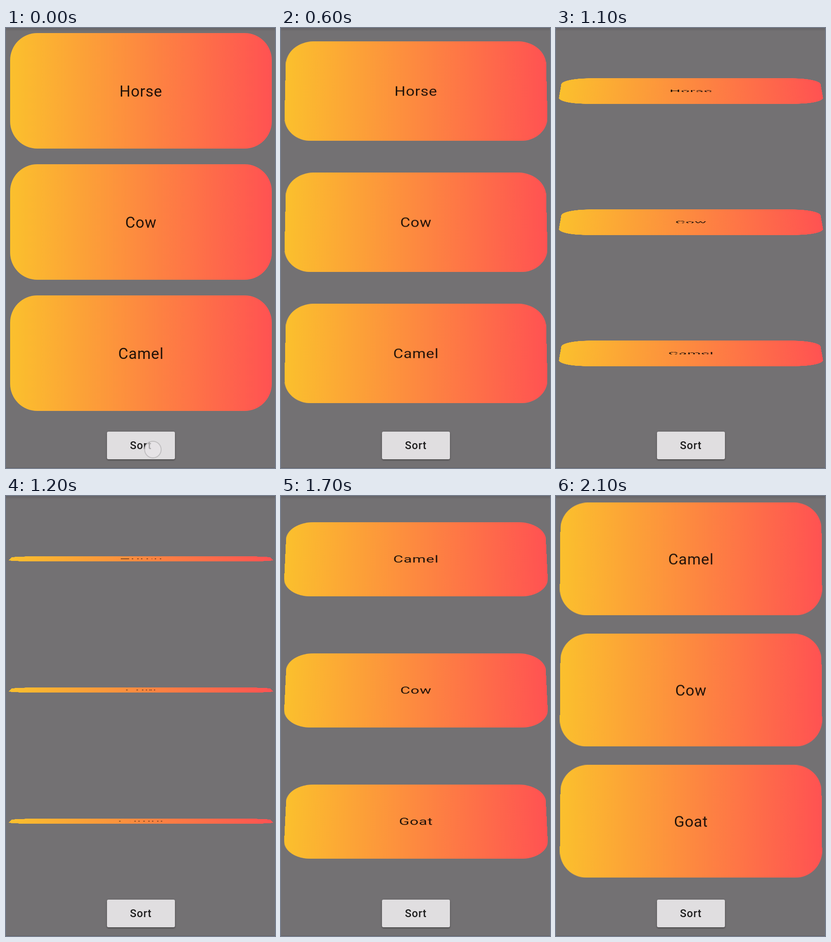
An HTML page that plays this animation: 586 px wide and 956 px high, repeating every 2.2 s.

```html
<!DOCTYPE html>
<html lang="en">
<head>
<meta charset="utf-8">
<title>Flip sort</title>
<style>
  html, body { margin: 0; width: 100%; height: 100%; overflow: hidden; }

  body {
    position: relative;
    background:
      linear-gradient(#656366, rgba(101, 99, 102, 0)) 0 0 / 100% 7px no-repeat,
      linear-gradient(#626063, #626063) 0 100% / 100% 1px no-repeat,
      #737173;
    font-family: Roboto, sans-serif;
    color: rgba(0, 0, 0, .87);
  }

  /* The picture advances ten times a second, hence the stepped timing. */
  .card, .card span, .touch {
    animation: 2200ms step-end -2ms infinite;
  }

  .card {
    position: absolute;
    left: 9px;
    top: calc(11px + 285px * var(--row));
    width: 570px;
    height: 251px;
    border-radius: 59px;
    background: linear-gradient(90deg, #fbc02d, #ff5252);
    font-size: 33.4px;
    letter-spacing: .84px;
    line-height: 253px;
    text-align: center;
    animation-name: flip;
  }

  .card span { position: absolute; inset: 0; }
  .card .before { animation-name: leave; }
  .card .after { animation-name: enter; }

  .button {
    position: absolute;
    left: 220px;
    top: 877px;
    width: 147.5px;
    height: 60px;
    border-radius: 3.3px;
    background: #e0dee0;
    box-shadow: 0 2px 3px rgba(0, 0, 0, .3), 0 1px 5px rgba(0, 0, 0, .14);
    font-size: 23.4px;
    font-weight: 500;
    letter-spacing: .9px;
    line-height: 60px;
    text-align: center;
  }

  .touch {
    position: absolute;
    left: 300.5px;
    top: 897px;
    width: 38px;
    height: 38px;
    box-sizing: border-box;
    border: 2px solid rgba(186, 184, 186, .85);
    border-radius: 50%;
    background: rgba(232, 230, 232, .7);
    animation-name: leave-touch;
  }

  @keyframes flip {
    0% { transform: perspective(7200px) rotateX(0deg); }
    13.63636% { transform: perspective(7200px) rotateX(2.5deg); animation-timing-function: steps(3); }
    27.27273% { transform: perspective(7200px) rotateX(30.6deg); animation-timing-function: steps(3); }
    40.90909% { transform: perspective(7200px) rotateX(56.9deg); animation-timing-function: steps(3); }
    54.54545% { transform: perspective(7200px) rotateX(87.5deg); }
    59.09091% { transform: perspective(7200px) rotateX(87.4deg); animation-timing-function: steps(8); }
    95.45455% { transform: perspective(7200px) rotateX(12.6deg); }
    100% { transform: perspective(7200px) rotateX(0deg); }
  }

  @keyframes leave {
    0% { opacity: 1; }
    59.09091%, 100% { opacity: 0; }
  }

  @keyframes enter {
    0% { opacity: 0; }
    59.09091%, 100% { opacity: 1; }
  }

  @keyframes leave-touch {
    0% { opacity: 1; }
    13.63636%, 100% { opacity: 0; }
  }
</style>
</head>
<body>
  <div class="card" style="--row: 0"><span class="before">Horse</span><span class="after">Camel</span></div>
  <div class="card" style="--row: 1"><span class="before">Cow</span><span class="after">Cow</span></div>
  <div class="card" style="--row: 2"><span class="before">Camel</span><span class="after">Goat</span></div>
  <div class="button">Sort</div>
  <div class="touch"></div>
</body>
</html>
```
